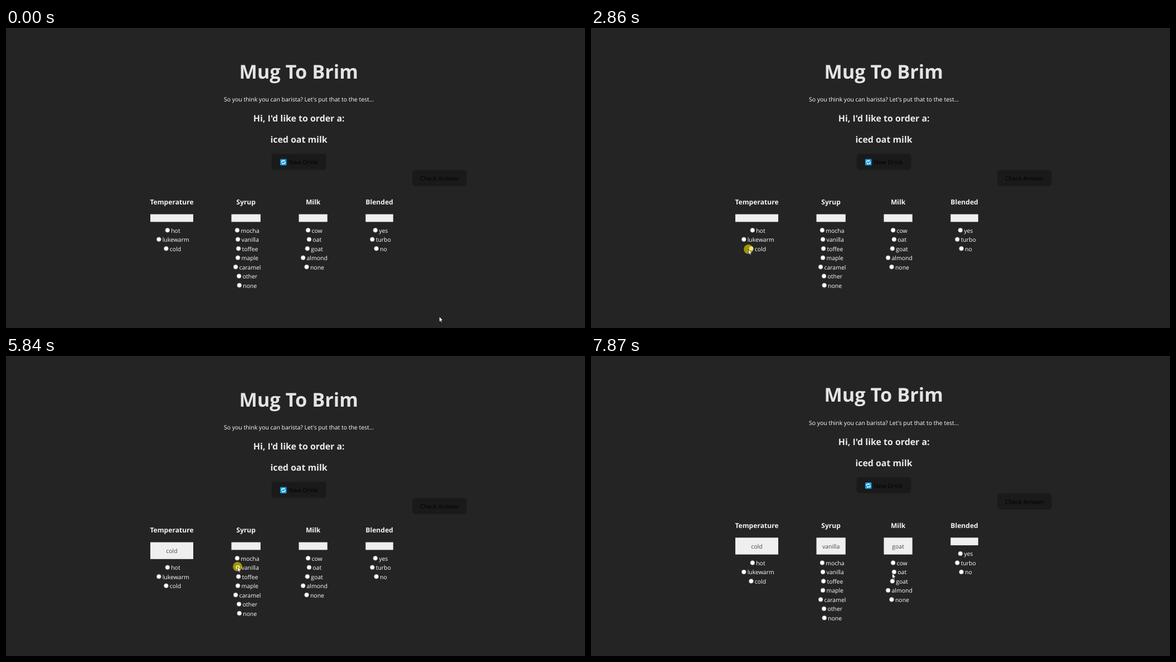
Recreate the animation shown at these times as an HTML page. Size 1039 by 539 pixels, loop 8 s.

```html
<!DOCTYPE html>
<html lang="en">
<head>
<meta charset="utf-8">
<title>Mug To Brim</title>
<style>
  html, body { margin: 0; width: 100%; height: 100%; overflow: hidden; background: #242424; }
  svg { display: block; width: 100%; height: 100%; }
  text { font-family: "Open Sans", "Noto Sans", sans-serif; font-size: 10.48px; fill: #fff; text-rendering: geometricPrecision; }
  .mid { text-anchor: middle; }
  .h1, .h2, .h3 { font-weight: 700; fill: #e4e4e4; }
  .h1 { font-size: 34.3px; }
  .h2 { font-size: 15.9px; fill: #ececec; }
  .h3 { font-size: 12.1px; fill: #f4f4f4; }
  .button { fill: #1a1a1a; stroke-width: .7; }
  .caption { font-size: 10.7px; font-weight: 500; fill: #000; }
  .box { fill: #efefef; }
  .choice { fill: #484848; }
  .radio { fill: #fff; stroke: #767676; stroke-width: .6; }
</style>
</head>
<body>
<svg id="stage" viewBox="0 0 1039 539">
  <g id="page">
    <text class="h1 mid" x="525.2" y="90.6">Mug To Brim</text>
    <text class="mid" x="525.5" y="131.8">So you think you can barista? Let's put that to the test...</text>
    <text class="h2 mid" x="525.7" y="167.8">Hi, I'd like to order a:</text>
    <text class="h2 mid" x="525.5" y="206.2">iced oat milk</text>
    <rect id="newDrink" class="button" x="476.6" y="226" width="97.8" height="28.8" rx="5.5"/>
    <rect x="492" y="235.4" width="11.4" height="11.4" rx="1.4" fill="#1a9fe3"/>
    <g fill="none" stroke="#fff" stroke-width="1.3">
      <path d="M494.6 241.6v-1.1q0-2 2-2h2.6M500.8 240.6v1.1q0 2-2 2h-2.6"/>
      <path d="M498.6 236.8l2 1.7-2 1.7zM496.8 242l-2 1.7 2 1.7z" fill="#fff" stroke="none"/>
    </g>
    <text class="caption" x="507.6" y="244.9">New Drink</text>
    <rect class="button" x="729.2" y="255.1" width="97.6" height="28.8" rx="5.5"/>
    <text class="caption mid" x="778" y="274.1">Check Answer</text>
  </g>
  <circle id="click" r="8.4" fill="#e8da00" fill-opacity=".62"/>
  <path id="cursor" d="M0 0V9.4L2.1 7.4 3.5 10.5 5 9.9 3.7 6.8 6.4 6.6Z" fill="#fff" stroke="#000" stroke-width=".6"/>
</svg>
<script>
const LOOP = 8000, ROW = 16.5;
const $ = id => document.getElementById(id);

function add(parent, tag, attrs, text = "") {
  const node = document.createElementNS("http://www.w3.org/2000/svg", tag);
  for (const key in attrs) node.setAttribute(key, attrs[key]);
  node.textContent = text;
  return parent.appendChild(node);
}

// Options are [label, radio centre x]; an answered column grows by one row.
const columns = [
  { title: "Temperature", x: 259, w: 77, answer: "cold", at: 4060,
    options: [["hot", 289.8], ["lukewarm", 274.3], ["cold", 287.4]] },
  { title: "Syrup", x: 404.5, w: 52.3, answer: "vanilla", at: 6110,
    options: [["mocha", 414.9], ["vanilla", 416.1], ["toffee", 417.1], ["maple", 416.1],
              ["caramel", 412.1], ["other", 418.1], ["none", 418.7]] },
  { title: "Milk", x: 525.5, w: 51.2, answer: "goat", at: 7870,
    options: [["cow", 542.1], ["oat", 543.9], ["goat", 540.8], ["almond", 533.1], ["none", 539.5]] },
  { title: "Blended", x: 645.3, w: 49.5, answer: "", at: Infinity,
    options: [["yes", 662.8], ["turbo", 657.3], ["no", 664.6]] }
];

for (const col of columns) {
  const mid = col.x + col.w / 2;
  add($("page"), "text", { class: "h3 mid", x: mid, y: 317.2 }, col.title);
  col.box = add($("page"), "rect", { class: "box", x: col.x, y: 334.6, width: col.w });
  col.choice = add($("page"), "text", { class: "choice mid", x: mid, y: 353.9 }, col.answer);
  col.list = add($("page"), "g", {});
  col.options.forEach(([label, x], i) => {
    add(col.list, "circle", { class: "radio", cx: x, cy: 363.3 + i * ROW, r: 4 });
    add(col.list, "text", { x: x + 6.4, y: 367.7 + i * ROW }, label);
  });
}

// Pointer moves: first and last change, number of steps, waypoints [progress, x, y].
const moves = [
  { from: 320, to: 590, steps: 5, path: [[0, 777.5, 518.5], [.2, 735, 505], [.6, 520, 435], [1, 416.5, 401.5]] },
  { from: 920, to: 1680, steps: 11, path: [[0, 416.5, 401.5], [4 / 11, 285.5, 386], [8 / 11, 373, 318], [1, 531.5, 254.5]] },
  { from: 1750, to: 2520, steps: 12, path: [[0, 531.5, 254.5], [1 / 12, 528, 243], [2 / 12, 510, 249], [4 / 12, 390, 316], [7 / 12, 296, 367], [1, 282.5, 397.5]] },
  { from: 3390, to: 3600, steps: 4, path: [[0, 282.5, 397.5], [.6, 285, 393.5], [1, 286.5, 395.5]] },
  { from: 4330, to: 4620, steps: 5, path: [[0, 286.5, 395.5], [.6, 370, 390], [1, 413.5, 393]] },
  { from: 4820, to: 5290, steps: 8, path: [[0, 413.5, 393], [.5, 416.5, 383.5], [1, 418.5, 394]] },
  { from: 5430, to: 5640, steps: 4, path: [[0, 418.5, 394], [1, 415.5, 378.5]] },
  { from: 6320, to: 7060, steps: 12, path: [[0, 415.5, 378.5], [.3, 470, 372], [.7, 566, 386], [1, 545, 397]] },
  { from: 7130, to: 7470, steps: 5, path: [[0, 545, 397], [1, 540.5, 390.5]] }
];
const clicks = [[2860, 3060], [3870, 4060], [5840, 6110], [7670, 7870]];

function along(path, p) {
  const i = Math.max(1, path.findIndex(point => point[0] >= p - 1e-6));
  const [p0, x0, y0] = path[i - 1], [p1, x1, y1] = path[i];
  const k = (p - p0) / (p1 - p0);
  return [x0 + (x1 - x0) * k, y0 + (y1 - y0) * k];
}

function pointerAt(t) {
  const move = moves.filter(m => t >= m.from).pop();
  if (!move) return moves[0].path[0].slice(1);
  const step = Math.floor((t - move.from) / (move.to - move.from) * (move.steps - 1) + 1e-6);
  return along(move.path, Math.min(1, (step + 1) / move.steps));
}

function render(t) {
  $("page").setAttribute("transform", `translate(0 ${t >= columns[1].at ? -ROW / 2 : 0})`);
  for (const col of columns) {
    const grow = t >= col.at ? ROW : 0;
    col.box.setAttribute("height", 13.75 + grow);
    col.choice.setAttribute("visibility", grow ? "visible" : "hidden");
    col.list.setAttribute("transform", `translate(0 ${grow})`);
  }
  const glow = Math.max(0, Math.min((t - 1690) / 250, (2020 - t) / 250));
  $("newDrink").setAttribute("stroke", `rgba(100,108,255,${glow})`);
  const place = `translate(${pointerAt(t).join(" ")})`;
  $("cursor").setAttribute("transform", place);
  $("click").setAttribute("transform", place);
  $("click").setAttribute("visibility", clicks.some(([on, off]) => t >= on && t < off) ? "visible" : "hidden");
}

const start = performance.now();
function tick() {
  render((performance.now() - start) % LOOP);
  requestAnimationFrame(tick);
}
tick();
</script>
</body>
</html>
```
